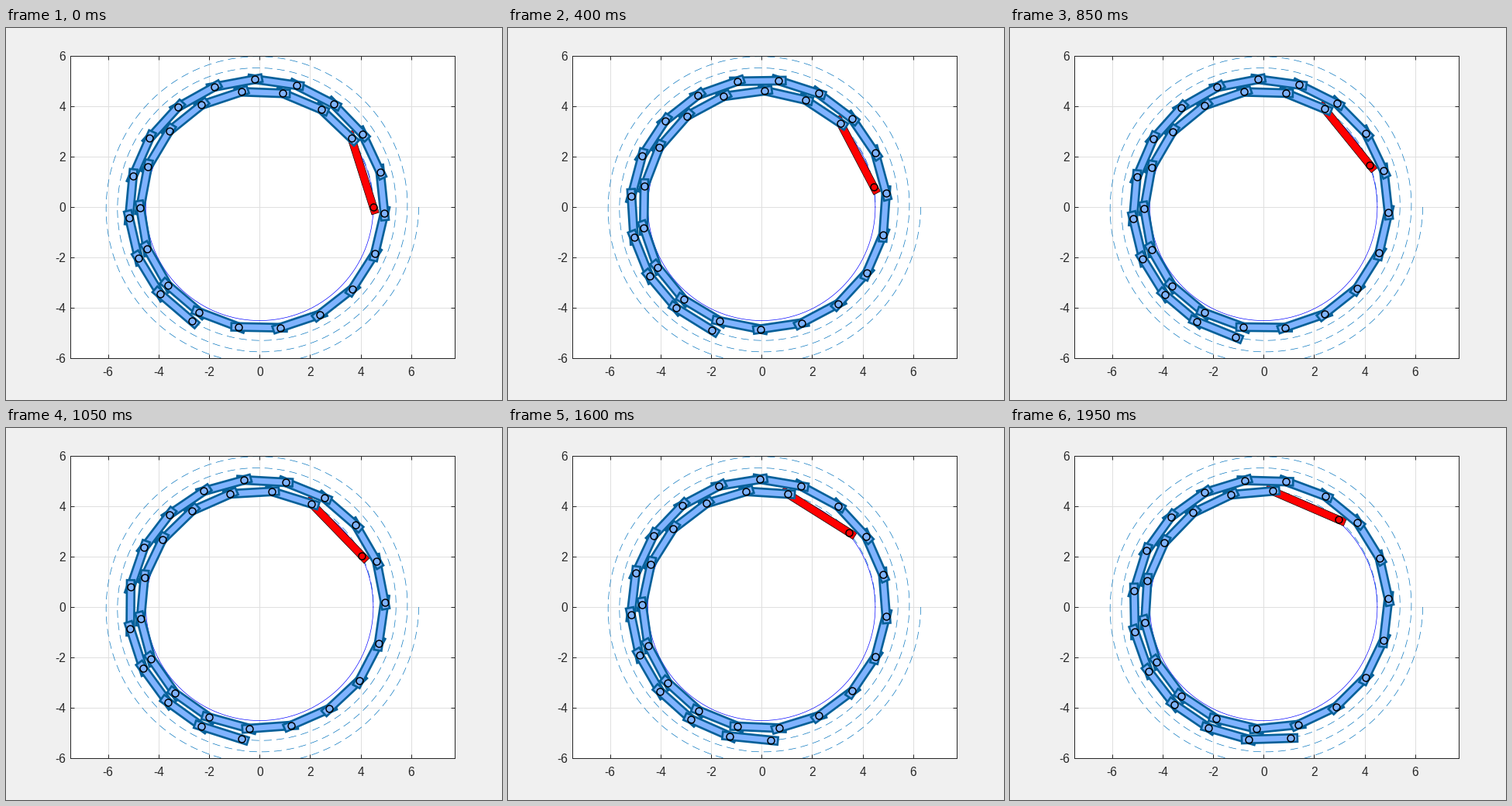
Write a matplotlib script that moves like this. It is 640x480 px and loops after 2000 ms.

```python
import numpy as np
import matplotlib.pyplot as plt
from matplotlib.animation import FuncAnimation
from matplotlib.collections import PolyCollection

FRAMES, INTERVAL = 40, 50
W, H = 640, 480
PX = 0.72                      # one pixel in points at 100 dpi
THIN = 0.67 * PX
TAU = 2 * np.pi
B = 0.45 / TAU                 # spiral r = B * angle
START, END = 10 * TAU, 14 * TAU
STEP = 0.1                     # arc length covered by the head per frame
LINKS = 30
HEAD, BODY = 2.86, 1.65        # distance between the two holes of a bench
HALF_WIDTH, OVERHANG = 0.15, 0.275
INK = (38 / 255,) * 3

plt.rcParams.update({"font.family": "Liberation Sans", "axes.unicode_minus": False})


def spiral(t):
    return np.stack([B * t * np.cos(t), B * t * np.sin(t)], axis=-1)


def next_angle(t, dist):
    """Angle of the next hole, a straight distance further out."""
    lo, hi = t, t + np.pi / 2
    p = spiral(t)
    for _ in range(36):
        mid = (lo + hi) / 2
        if np.hypot(*(spiral(mid) - p)) < dist:
            lo = mid
        else:
            hi = mid
    return (lo + hi) / 2


def holes(n):
    t = np.sqrt(START ** 2 + 2 * STEP * n / B)
    angles = [t]
    for i in range(LINKS):
        t = next_angle(t, BODY if i else HEAD)
        angles.append(t)
    return spiral(np.array(angles))


def bench(p, q):
    u = (q - p) / np.hypot(*(q - p))
    side = HALF_WIDTH * np.array([-u[1], u[0]])
    a, b = p - OVERHANG * u, q + OVERHANG * u
    return np.array([a + side, b + side, b - side, a - side])


fig = plt.figure(figsize=(W / 100, H / 100), dpi=100, facecolor=(240 / 255,) * 3)
left, top, width, height = 82.9, 35.6, 496, 390.8
ax = fig.add_axes([left / W, 1 - (top + height) / H, width / W, height / H])
ax.set(xlim=(-7.494, 7.721), ylim=(-6, 6),
       xticks=range(-6, 7, 2), yticks=range(-6, 7, 2))
ax.set_axisbelow(True)
ax.grid(color=(223 / 255,) * 3, lw=PX)
ax.tick_params(direction="in", top=True, right=True, length=5 * PX, width=PX,
               color=INK, labelcolor=INK, labelsize=15.5 * PX)
ax.tick_params(axis="x", pad=10.6 * PX)
ax.tick_params(axis="y", pad=6 * PX)
for spine in ax.spines.values():
    spine.set(color=INK, linewidth=PX)

ax.plot(*spiral(np.linspace(END, START, 2000)).T, color="#0072bd",
        lw=THIN, dashes=(15, 9), dash_capstyle="butt")
ring = np.linspace(0, TAU, 400)
ax.plot(4.5 * np.cos(ring), 4.5 * np.sin(ring), color="#0000ff", lw=THIN)

edges = ["black"] + ["#066099"] * (LINKS - 1)
fills = ["red"] + ["#80b3ff"] * (LINKS - 1)
widths = [THIN] + [2.7 * PX] * (LINKS - 1)
benches = PolyCollection([], facecolors=fills, edgecolors=edges,
                         linewidths=widths, joinstyle="miter", zorder=2.2)
ax.add_collection(benches, autolim=False)
pins, = ax.plot([], [], "o", ms=9 * PX, mfc="none", mec="black",
                mew=1.5 * PX, zorder=2.3, snap=False)


def draw(n):
    pts = holes(n)
    benches.set_verts([bench(p, q) for p, q in zip(pts[:-1], pts[1:])])
    pins.set_data(*pts.T)
    return benches, pins


anim = FuncAnimation(fig, draw, frames=FRAMES, interval=INTERVAL,
                     repeat=True, repeat_delay=0, blit=False)
plt.show()
```
